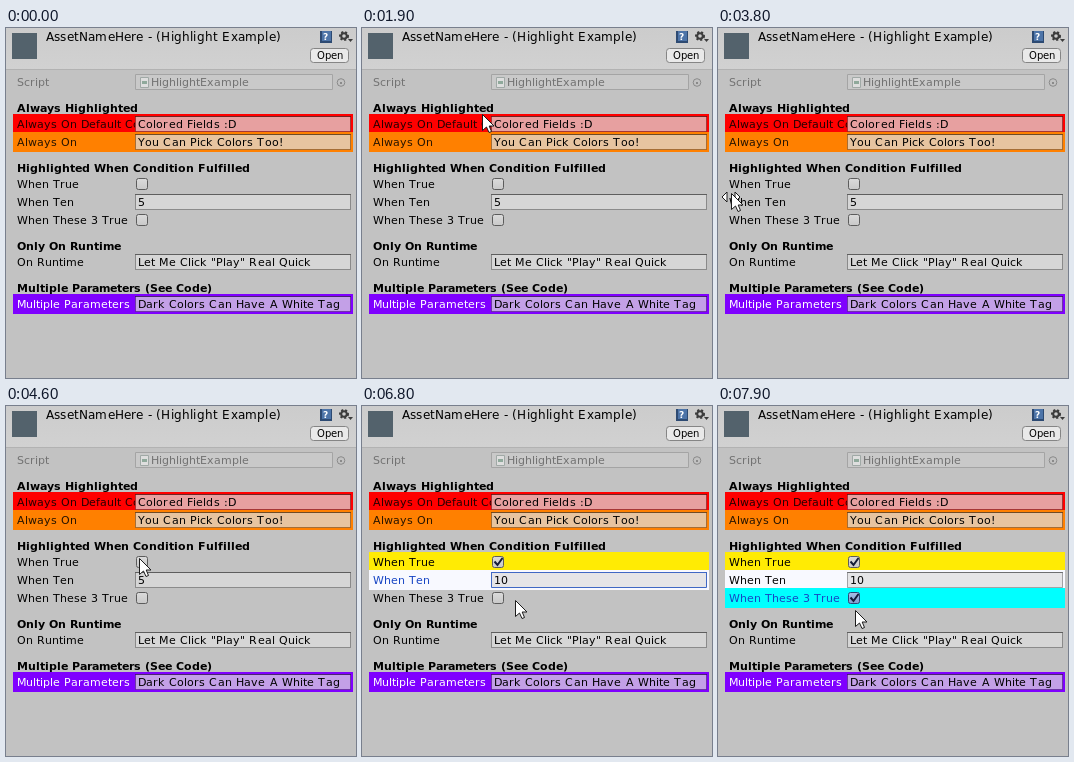
An HTML page with a canvas that plays this animation: 350x350 px, repeating every 8000 ms.

```html
<!DOCTYPE html>
<html lang="en">
<head>
<meta charset="utf-8">
<style>
  html, body { margin: 0; width: 350px; height: 350px; overflow: hidden; background: #c2c2c2; }
  canvas { display: block; }
</style>
</head>
<body>
<canvas id="stage" width="350" height="350"></canvas>
<script>
const c = document.getElementById('stage').getContext('2d');
const LOOP = 8000, STEP = 100, ROW = 18, GAP = 24;
const FACE = '"DejaVu Sans", Verdana, sans-serif';
const FONT = '11px ' + FACE;
const FOCUS = '#1745c4', TINTED = 'rgba(0,0,0,.85)';

// Pointer strokes; it rests between them
const moves = [
  { from: 700, to: 1000, x: 206, y: 96 },
  { from: 1400, to: 1800, x: 104, y: 85 },
  { from: 1800, to: 2200, x: 205, y: 91 },
  { from: 2300, to: 2800, x: 117, y: 104 },
  { from: 2800, to: 3100, x: 80, y: 137 },
  { from: 3200, to: 3500, x: 13, y: 165 },
  { from: 3800, to: 4500, x: 133, y: 152 },
  { from: 4900, to: 5200, x: 158, y: 170 },
  { from: 6100, to: 6800, x: 153, y: 194 },
  { from: 6800, to: 7300, x: 135, y: 194 },
  { from: 7700, to: 7900, x: 137, y: 204 }
];

const shapes = {
  arrow: new Path2D('M.5 .5V16.5L4.5 13L7 18.5L9.5 17.5L7.2 12H12Z'),
  slide: new Path2D('M-9 4L-4 -1V9ZM9 4L4 -1V9Z'),
  beam: new Path2D('M-3 -7.5H0M1 -7.5H4M.5 -7V8M-3 8.5H0M1 8.5H4'),
  check: new Path2D('M2.5 5.5L5.5 9L10.5 2'),
  menu: new Path2D('M342 11H347L344.5 14Z')
};

function pointerAt(t) {
  let x = 346, y = 36;
  for (const m of moves) {
    const k = Math.min(1, Math.max(0, (t - m.from) / (m.to - m.from)));
    const ease = k * k * (3 - 2 * k);
    x += (m.x - x) * ease;
    y += (m.y - y) * ease;
  }
  return [Math.round(x), Math.round(y)];
}

function rect(x, y, w, h, fill) {
  c.fillStyle = fill;
  c.fillRect(x, y, w, h);
}

function box(x, y, w, h, radius, fill, stroke) {
  c.beginPath();
  c.roundRect(x + .5, y + .5, w - 1, h - 1, radius);
  c.fillStyle = fill;
  c.fill();
  c.lineWidth = 1;
  c.strokeStyle = stroke;
  c.stroke();
}

function ring(x, y, r, width, color) {
  c.beginPath();
  c.arc(x, y, r, 0, 2 * Math.PI);
  c.lineWidth = width;
  c.strokeStyle = color;
  c.stroke();
}

function fade(y, h, top, bottom) {
  const g = c.createLinearGradient(0, y, 0, y + h);
  g.addColorStop(0, top);
  g.addColorStop(1, bottom);
  return g;
}

// Whole-pixel glyph advances, like hinted interface text
function text(str, x, y, color = '#000', font = FONT, spacing = 0) {
  c.font = font;
  c.fillStyle = color;
  for (const ch of str) {
    c.fillText(ch, Math.round(x), y);
    x += (ch === ' ' ? 4 : Math.round(c.measureText(ch).width)) + spacing;
  }
}

function field(value, y, focused) {
  const edge = focused ? '#3f68c4' : 'rgba(0,0,0,.32)';
  box(129, y, 216, 16, 0, 'rgba(222,222,222,.72)', edge);
  rect(129, y, 216, 1, edge);
  text(value, 132, y + 12, '#000', FONT, .12);
}

function checkbox(on, y, focused) {
  const fill = focused ? fade(y, 12, '#a9c0e6', '#7d9cd0') : fade(y, 12, '#dcdcdc', '#c8c8c8');
  box(130, y, 12, 12, 2, fill, focused ? '#2c4576' : '#5c5c5c');
  if (!on) return;
  c.save();
  c.translate(130, y);
  c.lineWidth = 2;
  c.strokeStyle = '#141c38';
  c.stroke(shapes.check);
  c.restore();
}

function row({ name, value, tint, ink = '#000', focused }, y) {
  if (tint) rect(7, y, 340, 20, tint);
  c.save();
  c.beginPath();
  c.rect(0, y, 129, 20);
  c.clip();
  text(name, 11, y + 14, focused ? FOCUS : ink);
  c.restore();
  if (typeof value === 'boolean') checkbox(value, y + 4, focused);
  else field(value, y + 2, focused);
}

function header() {
  rect(0, 0, 350, 41, fade(0, 41, '#cccccc', '#d1d1d1'));
  rect(0, 41, 350, 1, '#b2b2b2');
  rect(6, 5, 25, 26, '#53626c');
  text('AssetNameHere - (Highlight Example)', 40, 13, '#000', '12px ' + FACE, .2);

  rect(314, 3, 12, 12, '#2d4a72');
  rect(316, 3, 9, 10, '#4d74a8');
  text('?', 317, 12, '#fff', 'bold 9px ' + FACE);

  c.setLineDash([2, 1.9]);
  ring(338, 8, 4, 2, '#3c3c3c');
  c.setLineDash([]);
  ring(338, 8, 2.8, 2, '#3c3c3c');
  c.fillStyle = '#3c3c3c';
  c.fill(shapes.menu);

  box(304, 20, 39, 15, 3, '#e9e9e9', '#858585');
  text('Open', 311, 31, '#000', '10px ' + FACE);
}

function scriptRow() {
  text('Script', 11, 58, '#727272');
  box(129, 46, 198, 16, 0, '#c9c9c9', '#a4a4a4');
  box(134, 49, 9, 11, 0, '#dedede', '#a0a9a6');
  rect(136, 53, 5, 3, '#8fa99b');
  text('HighlightExample', 145, 58, '#727272');
  ring(335, 54.5, 3.8, 1, '#8a8a8a');
  rect(334, 54, 2, 2, '#8a8a8a');
}

function outlined(shape) {
  c.fillStyle = '#fff';
  c.fill(shape);
  c.stroke(shape);
}

function pointer(x, y) {
  const overField = x > 129 && ((y > 88 && y < 122) || (y > 166 && y < 182));
  const overNumberLabel = x < 60 && y > 164 && y < 182;
  c.save();
  c.translate(x, y);
  c.lineWidth = 1;
  c.strokeStyle = '#1c1c1c';
  if (overField) {
    c.stroke(shapes.beam);
  } else {
    if (overNumberLabel) outlined(shapes.slide);
    outlined(shapes.arrow);
  }
  c.restore();
}

function draw(t) {
  const isTrue = t >= 4900, isTen = t >= 6400, isThree = t >= 7700;
  const editing = t >= 6100 && !isThree;
  const ten = isTen ? '10' : t >= 6200 ? '1' : '5';
  const groups = {
    'Always Highlighted': [
      { name: 'Always On Default Color', value: 'Colored Fields :D', tint: '#f00', ink: TINTED },
      { name: 'Always On', value: 'You Can Pick Colors Too!', tint: '#ff8000', ink: TINTED }
    ],
    'Highlighted When Condition Fulfilled': [
      { name: 'When True', value: isTrue, tint: isTrue && '#ffeb04', focused: isTrue && t < 6100 },
      { name: 'When Ten', value: ten, tint: isTen && '#f8f9ff', focused: editing },
      { name: 'When These 3 True', value: isThree, tint: isThree && '#0ff', focused: isThree }
    ],
    'Only On Runtime': [
      { name: 'On Runtime', value: 'Let Me Click "Play" Real Quick' }
    ],
    'Multiple Parameters (See Code)': [
      { name: 'Multiple Parameters', value: 'Dark Colors Can Have A White Tag', tint: '#7f00ff', ink: '#fff' }
    ]
  };

  rect(0, 0, 350, 350, '#c2c2c2');
  header();
  scriptRow();
  let y = 86;
  for (const [title, rows] of Object.entries(groups)) {
    text(title, 11, y - 2, '#000', 'bold ' + FONT);
    for (const item of rows) {
      row(item, y);
      y += ROW;
    }
    y += GAP;
  }
  if (t >= 700) pointer(...pointerAt(t));
}

function tick(now) {
  draw(Math.floor(now % LOOP / STEP) * STEP);
  requestAnimationFrame(tick);
}
requestAnimationFrame(tick);
</script>
</body>
</html>
```
